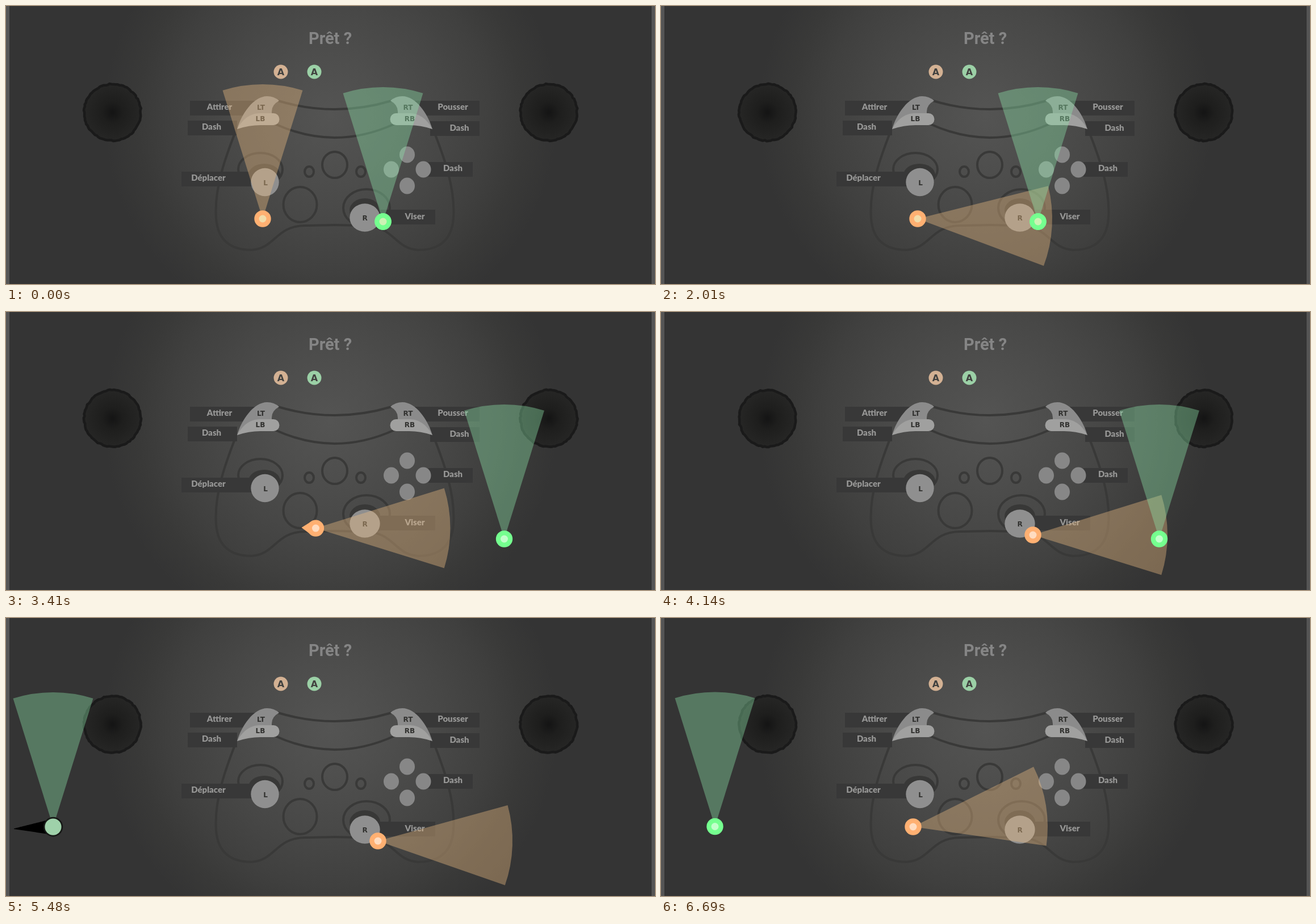
An HTML page with a canvas that plays this animation: 1143x490 px, repeating every 6760 ms.

```html
<!DOCTYPE html>
<html lang="fr">
<head>
<meta charset="utf-8">
<style>
  html, body { margin: 0; width: 100%; height: 100%; overflow: hidden; background: #343434; }
  svg, canvas { position: absolute; left: 0; top: 0; }
  .line { fill: none; stroke: #393938; stroke-width: 4; }
  .box rect { fill: #383838; height: 26px; }
  .label { font: 900 15px Lato, sans-serif; fill: #969695; text-anchor: middle; }
  .key { font: bold 12px "DejaVu Sans", sans-serif; fill: #31312f; text-anchor: middle; }
</style>
</head>
<body>
<svg width="1143" height="490" viewBox="0 0 1143 490">
  <defs>
    <radialGradient id="glow" gradientUnits="userSpaceOnUse" cx="572" cy="192" r="400">
      <stop offset="0" stop-color="#545453"/>
      <stop offset=".25" stop-color="#4e4e4d"/>
      <stop offset=".5" stop-color="#474746"/>
      <stop offset=".7" stop-color="#40403f"/>
      <stop offset=".85" stop-color="#393938"/>
      <stop offset="1" stop-color="#343434"/>
    </radialGradient>
    <g id="triggers">
      <path fill="#8b8b8b" d="M407 217C415 190 436 159 460 159Q472 159 481 167Q468 174 468 186V192H440Z"/>
      <path fill="#a0a09f" d="M407 217C418 197 432 189 448 189H471A10.5 10.5 0 0 1 471 210H448Q428 210 407 217Z"/>
    </g>
    <path id="side" class="line" d="M405 219C390 258 366 318 370 374C373 415 398 430 432 430C475 428 474 386 530 387L579 386"/>
  </defs>
  <rect width="1143" height="490" fill="#555"/>
  <rect x="6" width="1131" height="490" fill="url(#glow)"/>
  <use href="#side"/>
  <use href="#side" transform="matrix(-1 0 0 1 1158 0)"/>
  <g class="line">
    <path d="M479 167Q579 197 679 167M474 208Q527 232 579 232Q631 232 684 208"/>
    <ellipse cx="579" cy="280" rx="22" ry="23"/>
    <ellipse cx="534" cy="292" rx="8" ry="9"/>
    <ellipse cx="625" cy="292" rx="8" ry="9"/>
    <ellipse cx="518" cy="350" rx="29.5" ry="31"/>
    <ellipse cx="448" cy="288" rx="39" ry="29"/>
    <ellipse cx="635" cy="356" rx="41" ry="33"/>
  </g>
  <g fill="#383837">
    <ellipse cx="455" cy="298" rx="28" ry="20"/>
    <ellipse cx="632" cy="360" rx="27" ry="21"/>
  </g>
  <g class="box">
    <rect x="324" y="167" width="116"/>
    <rect x="320" y="202" width="87"/>
    <rect x="309" y="292" width="128"/>
    <rect x="720" y="167" width="114"/>
    <rect x="747" y="203" width="87"/>
    <rect x="744" y="275" width="78"/>
    <rect x="650" y="359" width="106"/>
  </g>
  <use href="#triggers"/>
  <use href="#triggers" transform="matrix(-1 0 0 1 1158 0)"/>
  <g fill="#878787">
    <ellipse cx="706.5" cy="262" rx="13.5" ry="14.5"/>
    <ellipse cx="678.5" cy="288" rx="13.5" ry="14.5"/>
    <ellipse cx="735" cy="288" rx="13.5" ry="14.5"/>
    <ellipse cx="706.5" cy="317" rx="13.5" ry="14.5"/>
  </g>
  <g fill="#8f8f8f">
    <circle cx="456" cy="310.5" r="24.7"/>
    <ellipse cx="632" cy="373" rx="26.7" ry="24.7"/>
  </g>
  <circle cx="484" cy="116" r="12.5" fill="#d3b193"/>
  <circle cx="543" cy="116" r="12.5" fill="#9bd0a6"/>
  <g class="key">
    <text x="449" y="183">LT</text><text x="448" y="203">LB</text>
    <text x="708" y="183">RT</text><text x="711" y="203">RB</text>
    <text x="457" y="316">L</text><text x="632" y="378">R</text>
    <g style="font-size:16px;fill:#41413f"><text x="484" y="122">A</text><text x="543" y="122">A</text></g>
  </g>
  <g class="label">
    <text x="376" y="183">Attirer</text><text x="362" y="218">Dash</text>
    <text x="356.500" y="308">Déplacer</text><text x="787" y="183">Pousser</text>
    <text x="798.500" y="220">Dash</text><text x="787" y="291">Dash</text><text x="720" y="376">Viser</text>
  </g>
  <text x="571" y="67" text-anchor="middle" style="font:bold 29px Roboto,sans-serif;fill:#858585">Prêt ?</text>
</svg>
<canvas id="stage" width="1143" height="490"></canvas>
<script>
const ctx = document.getElementById('stage').getContext('2d');
const LOOP = 6760, HOLD = 200, STEP = 66.8;
const REACH = 237, SPREAD = 17.3, DEG = Math.PI / 180;
const clamp = v => Math.max(0, Math.min(1, v));
const mix = (a, b, u) => a + (b - a) * u;
const mixPoint = (a, b, u) => [mix(a[0], b[0], u), mix(a[1], b[1], u)];
const smooth = u => u * u * (3 - 2 * u);

function random(seed) {
  return () => (seed = (seed * 16807) % 2147483647) / 2147483647;
}

// [time, degrees]
const AIM = [[200, -90], [700, 16], [1000, -10], [1350, 16], [1670, 4], [2010, 3.2], [2740, 3.2],
  [2900, 0], [4210, 0], [4500, 1], [4750, 0], [4900, 0], [5200, 1.9], [6350, 2], [6690, -9.2]];

function aimAt(t) {
  const i = AIM.findIndex(k => k[0] > t);
  if (i < 0) return AIM[AIM.length - 1][1];
  if (i === 0) return AIM[0][1];
  const [t0, a] = AIM[i - 1], [t1, b] = AIM[i];
  return mix(a, b, smooth((t - t0) / (t1 - t0)));
}

// Each shot throws the green player against a wall and lets it drift back.
const SHOTS = [
  { start: 2010, hit: 2175, rest: 3410, from: [664, 380], wall: [1126, 389], to: [877.5, 400] },
  { start: 4750, hit: 5045, rest: 6015, from: [877.5, 400], wall: [18, 371.5], to: [95, 367.5] }
];

function greenAt(t, shot) {
  if (!shot) return SHOTS[0].from;
  if (t < shot.hit) return mixPoint(shot.from, shot.wall, (t - shot.start) / (shot.hit - shot.start));
  const u = clamp((t - shot.hit) / (shot.rest - shot.hit));
  return mixPoint(shot.wall, shot.to, 1 - (1 - u) ** 3.15);
}

function orangeAt(t) {
  const near = [452, 375], far = [655, 393], end = [444, 368];
  if (t >= 5550) return mixPoint(far, end, clamp((t - 5550) / 630));
  const u = clamp((t - 2900) / 1100);
  return [mix(near[0], far[0], u), mix(near[1], far[1], u ** 1.4)];
}

function disc(x, y, r, fill) {
  ctx.beginPath();
  ctx.arc(x, y, r, 0, 2 * Math.PI);
  ctx.fillStyle = fill;
  ctx.fill();
}

function hole(x, y, t) {
  const shade = ctx.createRadialGradient(x, y, 2, x, y, 50);
  shade.addColorStop(0, '#151515');
  shade.addColorStop(.35, '#1e1e1d');
  shade.addColorStop(1, '#262625');
  const turn = t / 900, rnd = random(71);
  ctx.beginPath();
  for (let i = 0; i < 90; i++) {
    const a = i * 4 * DEG + turn, r = 49 + rnd() * 1.8;
    ctx.lineTo(x + r * Math.cos(a), y + r * Math.sin(a));
  }
  ctx.closePath();
  ctx.fillStyle = shade;
  ctx.fill();
  ctx.strokeStyle = '#1a1a1a';
  ctx.lineWidth = 4.5;
  ctx.stroke();
}

function cone([x, y], degrees, rgb) {
  ctx.beginPath();
  ctx.moveTo(x, y);
  ctx.arc(x, y, REACH, (degrees - SPREAD) * DEG, (degrees + SPREAD) * DEG);
  ctx.closePath();
  ctx.fillStyle = `rgba(${rgb},.39)`;
  ctx.fill();
}

// Brush bands: x0, y0, x1, y1, thickness
const BANDS = [[10, -8, 192, -59, 17], [45, -18, 267, -41, 17], [133, -14, 182, -15, 8],
  [180, 2, 277, 3, 2], [10, 8, 205, 40, 34], [85, 33, 245, 80, 18]];

function spray([x, y], degrees, age) {
  if (age < 0 || age > 420) return;
  const front = clamp(age / 110) * 280, back = clamp((age - 150) / 270) * 280;
  const rnd = random(193);
  ctx.save();
  ctx.translate(x, y);
  ctx.rotate(degrees * DEG);
  ctx.strokeStyle = '#e2e2e2';
  ctx.lineCap = 'round';
  for (const [x0, y0, x1, y1, thick] of BANDS) {
    for (let i = 0; i < thick * 5; i++) {
      const u = rnd() * .85, v = Math.min(1, u + .1 + rnd() * .22);
      const side = (rnd() - .5) * thick;
      const at = w => [mix(x0, x1, w), mix(y0, y1, w) + side * Math.sin(Math.PI * (.08 + .84 * w))];
      const a = at(u), b = at(v);
      ctx.lineWidth = .7 + rnd() * 1.8;
      if (b[0] > front || a[0] < back) continue;
      ctx.beginPath();
      ctx.moveTo(...a);
      ctx.lineTo(...b);
      ctx.stroke();
    }
  }
  ctx.restore();
}

function ribbon(head, tail, width) {
  const dx = tail[0] - head[0], dy = tail[1] - head[1], length = Math.hypot(dx, dy);
  if (length < 2) return;
  ctx.save();
  ctx.translate(...head);
  ctx.rotate(Math.atan2(dy, dx));
  ctx.beginPath();
  for (let i = 0; i <= 40; i++) ctx.lineTo(length * i / 40, -width(i / 40));
  for (let i = 40; i >= 0; i--) ctx.lineTo(length * i / 40, width(i / 40));
  ctx.fillStyle = '#000';
  ctx.fill();
  ctx.restore();
}

const flightWidth = s => .5 + 12 * Math.min(1, 1.45 * clamp(1 - s / .42)) + 4 * Math.exp(-(((s - .59) / .07) ** 2));
const driftWidth = s => .4 + 11.5 * Math.min(1, 1.2 * (1 - s));

function trail(t, shot, green) {
  ctx.save();
  ctx.beginPath();
  ctx.rect(6, 0, 1131, 490);
  ctx.clip();
  if (t < shot.hit) {
    ribbon(green, shot.from, flightWidth);
  } else {
    const since = t - shot.hit, edge = shot.wall[0] > 600 ? 12 : -4;
    const tail = [shot.wall[0] + edge, shot.wall[1]];
    if (since < 200) ribbon(shot.wall, mixPoint(shot.from, shot.wall, since / 200), flightWidth);
    if (since < 800) ribbon(green, mixPoint(tail, green, clamp((since - 500) / 300)), driftWidth);
  }
  ctx.restore();
}

function orangePlayer([x, y], t) {
  const dir = t > 2900 && t < 4000 ? -1 : t > 5550 && t < 6180 ? 1 : 0;
  if (dir) {
    ctx.beginPath();
    ctx.moveTo(x + dir * 25, y - 1);
    ctx.lineTo(x + dir * 9, y - 11);
    ctx.lineTo(x + dir * 9, y + 11);
    ctx.fillStyle = '#ffb072';
    ctx.fill();
  }
  disc(x, y, 14.7, '#ffb072');
  disc(x, y, 6.5, t < 2800 ? '#f2dcaa' : '#ffdcc0');
}

function greenPlayer([x, y], t, shot) {
  if (shot && t < shot.hit + 760) {
    disc(x, y, 17.3, '#161816');
    disc(x, y, 14.6, '#9fd1aa');
  } else {
    disc(x, y, 14.7, '#75ff8f');
    disc(x, y, 6.5, shot ? '#c2ffcb' : '#cdf2b4');
  }
}

function draw(t) {
  const shot = SHOTS.filter(s => t >= s.start).pop();
  const green = greenAt(t, shot), orange = orangeAt(t), aim = aimAt(t);
  ctx.clearRect(0, 0, 1143, 490);
  hole(187.5, 187.5, t);
  hole(956, 187.5, t);
  if (shot) spray(orange, aim, t - shot.start);
  cone(orange, aim, '240,190,132');
  cone(green, -90, '143,228,170');
  if (shot) trail(t, shot, green);
  greenPlayer(green, t, shot);
  orangePlayer(orange, t);
  if (!shot) greenPlayer(green, t, shot);
}

function tick() {
  const t = performance.now() % LOOP;
  draw(t < HOLD ? 0 : HOLD + Math.floor((t - HOLD) / STEP + .1) * STEP);
  requestAnimationFrame(tick);
}
tick();
</script>
</body>
</html>
```
